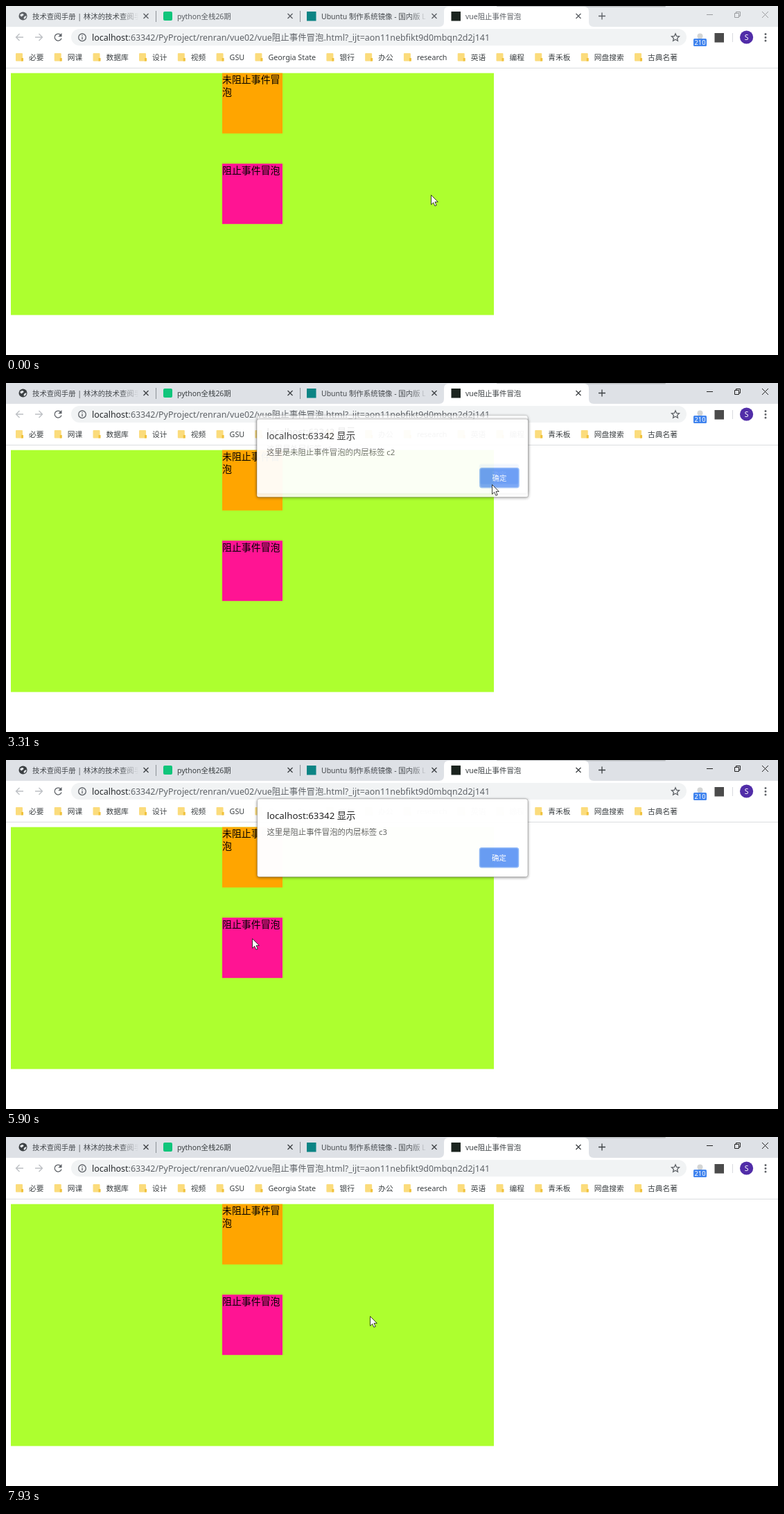
An HTML page for the animation above (7.99 s loop, 1114x503 px).

```html
<!DOCTYPE html>
<html lang="zh-CN">
<head>
<meta charset="utf-8">
<title>vue阻止事件冒泡</title>
<style>
  html, body { margin: 0; width: 100%; height: 100%; overflow: hidden; background: #fff; }
  svg { display: block; width: 1114px; height: 503px; font: 10.45px "Noto Sans", "Noto Sans CJK SC", "Noto Sans CJK", sans-serif; }
  text { white-space: pre; }
  .line { fill: none; stroke: #5f6368; stroke-width: 1.3; }
  .faint { stroke: #bdc0c4; }
  #strip { fill: #e7eaed; }
  #tabs { fill: #5a5e63; color: #5a5e63; }
  #win { fill: none; stroke: #9a9c9f; }
  .active #strip { fill: #dee1e6; }
  .active #tabs { fill: #3c4043; color: #3c4043; }
  .active #win { stroke: #222; }
  .cross { fill: none; stroke: currentColor; stroke-width: 1.3; }
  #marks { font-size: 10.75px; fill: #3c4043; }
  .page { font-size: 13.93px; }
  .dialog { filter: drop-shadow(0 1px 2px rgba(0, 0, 0, .45)); }
</style>
</head>
<body>
<svg id="stage" viewBox="0 0 1114 503">
  <defs>
    <linearGradient id="fadeA" gradientUnits="userSpaceOnUse" x1="166" x2="191" y1="0" y2="0">
      <stop stop-color="#45494d"/><stop offset="1" stop-color="#45494d" stop-opacity="0"/>
    </linearGradient>
    <linearGradient id="fadeB" href="#fadeA" x1="583" x2="608"/>
  </defs>

  <rect id="strip" width="1114" height="30"/>
  <rect x="708" width="244" height="1.5" rx="1" fill="#b4b7ba"/>
  <path d="M625 30Q632 30 632 23V8Q632 1 639 1H834Q841 1 841 8V23Q841 30 848 30Z" fill="#fff"/>
  <path d="M216.5 7V23M424.5 7V23" stroke="#8d9196"/>

  <g id="tabs">
    <circle cx="24.5" cy="14.5" r="6"/>
    <path d="M20 13Q23 10 25 11.5T22 15.5ZM25.5 17Q27 13.5 29.5 14.5Q29 18 26 19Z" fill="#e4e7ea"/>
    <rect x="227" y="8" width="13" height="13" rx="2" fill="#10c57b"/>
    <rect x="434" y="8" width="13.5" height="13.5" fill="#0c8484"/>
    <rect x="642.5" y="8" width="13.5" height="13.5" fill="#1b241f"/>
    <text x="38" y="19" fill="url(#fadeA)">技术查阅手册 | 林沐的技术查阅手</text>
    <text x="247" y="19">python全栈26期</text>
    <text x="455" y="19" fill="url(#fadeB)">Ubuntu 制作系统镜像 - 国内版 L</text>
    <text x="663" y="19">vue阻止事件冒泡</text>
    <path class="cross" d="M855 14.5h10m-5 -5v10"/>
  </g>
  <path id="win" d="M1011 12.5H1020M1051.5 10.5H1057.5V16.5H1051.5ZM1053.5 10V8.5H1059.5V14.5H1058M1091 8L1100 17M1100 8L1091 17"/>

  <path d="M0 89.5H1114" stroke="#dcdee0"/>
  <path class="line faint" d="M25 45H14.5M19.5 40L14.5 45L19.5 50M42 45H52.5M47.5 40L52.5 45L47.5 50"/>
  <path class="line" d="M79.2 42A5 5 0 1 0 80 46.5"/>
  <path d="M80.5 39V44.3H75.2Z" fill="#5f6368"/>
  <rect x="94" y="33" width="888" height="24" rx="12" fill="#f1f3f4"/>
  <circle class="line" cx="110" cy="45.3" r="5.3"/>
  <path class="line" d="M110 44.5V48.3M110 42V43.3"/>
  <text x="124" y="49.7" font-size="12.45" fill="#5f6368"><tspan fill="#25282b">localhost</tspan>:63342/PyProject/renran/vue02/vue阻止事件冒泡.html?_ijt=aon11nebfikt9d0mbqn2d2j141</text>
  <path id="star" class="line"/>
  <circle cx="1001.5" cy="43.5" r="4" fill="#d3d5d5"/>
  <rect x="992" y="47" width="19" height="11" rx="1.5" fill="#3f83ee"/>
  <text x="1001.5" y="56" font-size="9.3" fill="#fff" text-anchor="middle">210</text>
  <rect x="1022.5" y="39" width="13.5" height="13.5" fill="#4b4b4b"/>
  <path d="M1048.5 39V52" stroke="#d9dbde"/>
  <circle cx="1068.6" cy="45" r="9.6" fill="#512da8"/>
  <text x="1068.6" y="48.8" fill="#fff" text-anchor="middle">S</text>
  <path d="M1096 40.5v10" stroke="#5f6368" stroke-width="3" stroke-linecap="round" stroke-dasharray="0 4.8"/>
  <g id="marks"></g>

  <g class="page">
    <rect x="7" y="96.7" width="697" height="348.7" fill="#adff2f"/>
    <rect x="312" y="96.7" width="87" height="87" fill="#ffa500"/>
    <rect x="312" y="227.2" width="87" height="87" fill="#ff1493"/>
    <text x="312" y="111">未阻止事件冒</text>
    <text x="312" y="129">泡</text>
    <text x="312" y="242">阻止事件冒泡</text>
  </g>

  <g id="dialogs"></g>
  <g id="pointer">
    <circle id="ring" r="11" fill="#ff0" fill-opacity=".47"/>
    <path d="M.5 .5V14.2L3.7 11.3L5.9 16.2L8.2 15.2L6 10.4H10.3Z" fill="#fff" stroke="#111" stroke-width=".8"/>
  </g>
</svg>
<script>
const $ = id => document.getElementById(id);
const LOOP = 7990, STEP = 63, FOCUS = 1780;

// Bookmarks flow from left to right
let left = 33;
for (const label of '必要,网课,数据库,设计,视频,GSU,Georgia State,银行,办公,research,英语,编程,青禾板,网盘搜索,古典名著'.split(',')) {
  $('marks').insertAdjacentHTML('beforeend',
    `<rect x="${left - 19}" y="68" width="10" height="11.5" rx="1" fill="#fbdc7c"/>
     <rect x="${left - 11}" y="75" width="3" height="4.5" fill="#f0c13c"/>
     <text x="${left}" y="77.8">${label}</text>`);
  left += $('marks').lastElementChild.getComputedTextLength() + 34.25;
}

for (let x = 202; x < 830; x += 208) {
  $('tabs').insertAdjacentHTML('beforeend', `<path class="cross" d="M${x - 3.5} 11l7 7m0 -7l-7 7"/>`);
}

const star = Array.from({ length: 10 }, (_, i) => {
  const r = i % 2 ? 2.7 : 5.8, a = i * Math.PI / 5;
  return `${966 + r * Math.sin(a)} ${45.6 - r * Math.cos(a)}`;
});
$('star').setAttribute('d', `M${star.join('L')}Z`);

const dialogs = [
  { text: '这里是外层标签 c1', open: 3265, close: 4225 },
  { text: '这里是未阻止事件冒泡的内层标签 c2', open: 1710, close: 3248 },
  { text: '这里是阻止事件冒泡的内层标签 c3', open: 5733, close: 7405 }
];
$('dialogs').innerHTML = dialogs.map(d =>
  `<g class="dialog">
    <rect x="362.5" y=".3" width="390.5" height="112.5" rx="3" fill="#fff" stroke="#000" stroke-opacity=".2"/>
    <text x="376.5" y="29" font-size="13.3" fill="#222">localhost:63342 显示</text>
    <text x="376.5" y="52.7" font-size="11.34" fill="#626262">${d.text}</text>
    <rect x="683.5" y="71" width="56" height="28" rx="3" fill="#689bf5" stroke="#8fb8f8" stroke-width="1.5"/>
    <text x="711.5" y="89.3" fill="#fff" font-weight="500" text-anchor="middle">确定</text>
  </g>`).join('');
const panes = [...$('dialogs').children];

// Pointer moves: start, end, x, y
const moves = [
  [250, 690, 378, 145], [1060, 1060, 376, 145],
  [2120, 2700, 709, 142], [2700, 2870, 701, 146],
  [4425, 4820, 431, 232], [4880, 4940, 403, 250], [4940, 5240, 355, 257],
  [6240, 6850, 711, 141], [6850, 7020, 704, 152], [7616, 7930, 525, 258]
];
const clicks = [1120, 2940, 4050, 5550, 7240];

const beats = [0, 250, 1060, FOCUS, 2120, 2940, 4050, 4880, 5550, 5820, 6240, 7240];

const clamp = u => Math.max(0, Math.min(1, u));
const ease = u => u * u * (3 - 2 * u);

function snap(t) {
  const beat = beats.filter(b => b <= t).pop();
  return beat ? beat + STEP * Math.floor((t - beat) / STEP + .2) : 0;
}

function drawDialog(pane, { open, close }, t) {
  const rest = 1 - clamp((t - open) / 227), out = clamp((t - close) / 190);
  const rise = 20 * rest ** 2 + 17 * out, scale = 1 + out * .008;
  pane.style.opacity = (1 - rest ** 4) * (1 - out ** 2);
  pane.setAttribute('transform', `translate(${558 * (1 - scale)} ${58 - rise}) scale(${scale} 1)`);
}

function drawPointer(t) {
  let x = 613, y = 272;
  for (const [from, to, toX, toY] of moves) {
    if (t < from) break;
    const p = ease(clamp((t - from + STEP) / (to - from + STEP)));
    x += (toX - x) * p;
    y += (toY - y) * p;
  }
  $('pointer').setAttribute('transform', `translate(${Math.round(x)} ${Math.round(y)})`);
  $('ring').style.opacity = +clicks.some(c => t >= c && t < c + 1.5 * STEP);
}

function tick() {
  const t = snap((performance.now() - start) % LOOP);
  $('stage').classList.toggle('active', t >= FOCUS);
  dialogs.forEach((d, i) => drawDialog(panes[i], d, t));
  drawPointer(t);
  requestAnimationFrame(tick);
}
const start = performance.now();
tick();
</script>
</body>
</html>
```
